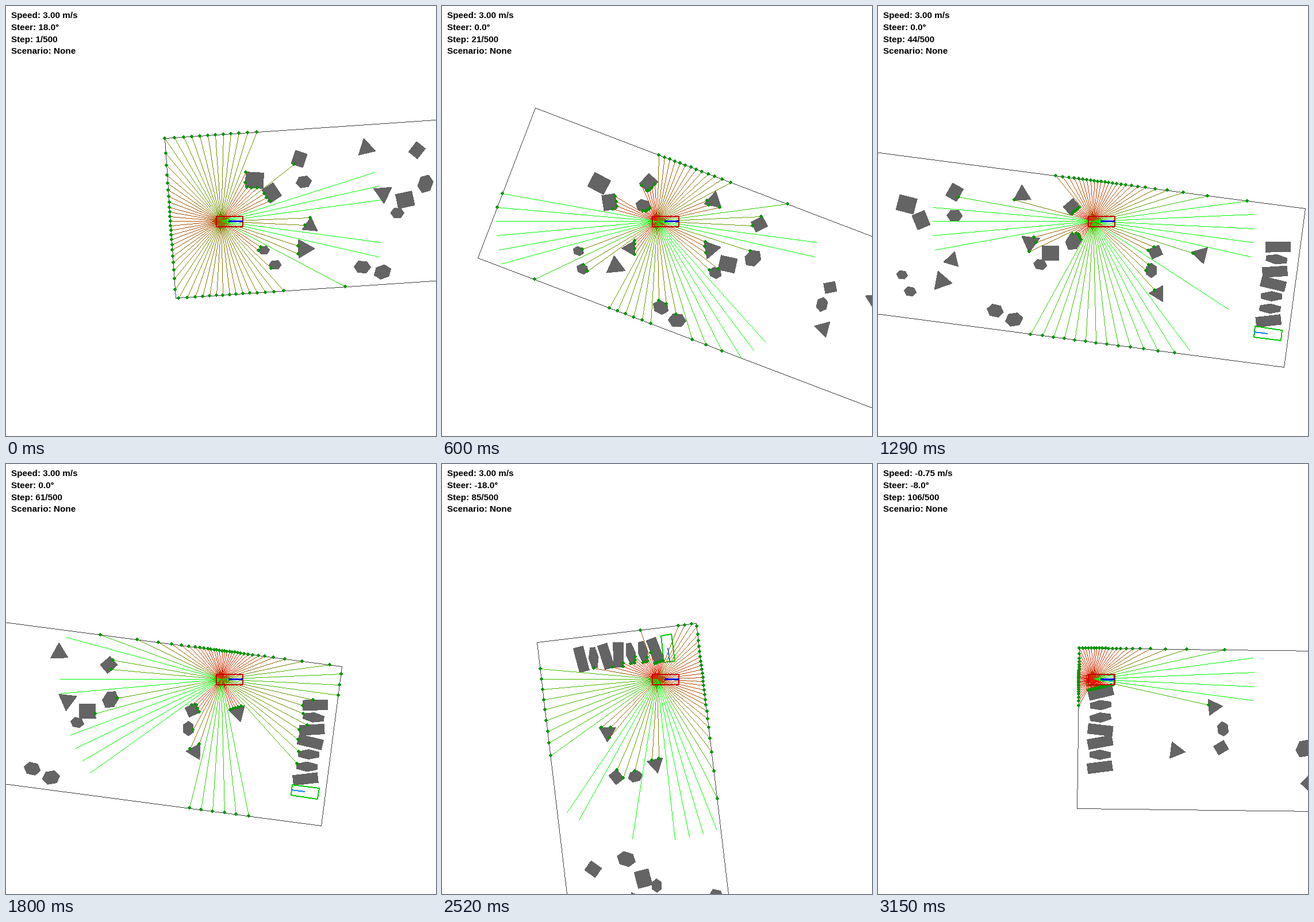
Animation, 748 px wide and 748 px high, one loop 3.18 s. Source, as a matplotlib script:

```python
import matplotlib.pyplot as plt
import numpy as np
from matplotlib.animation import FuncAnimation
from matplotlib.collections import PolyCollection

SIZE, DPI = 748, 100
PT = 72 / DPI                # points per pixel
STEPS, INTERVAL = 106, 30
CENTER = 374.4 + 374.4j      # rear axle on screen
RANGE, RAYS = 280, 72
STRIDE = 3.108               # pixels per step at 1 m/s
WHEELBASE = 28
ROOM_W, ROOM_H = 839, 279

GRAY, DARK = (100, 100, 100), (64, 64, 64)
RED, BLUE = (200, 0, 0), (0, 0, 220)
GREEN, SKY, LEAF = (0, 200, 0), (0, 128, 255), (0, 150, 0)

# Poses (step, x, y, heading in degrees) in room coordinates, y pointing down
WAYPOINTS = [
    (1, 88.4, 150.9, 3.85), (21, 269, 108.7, -20.85), (44, 476.8, 70.3, -7.48),
    (61, 633.7, 49.6, -7.5), (73, 732.2, 90.8, 56.95), (85, 750.5, 200, 96.75),
    (106, 813.9, 224.8, 179.28),
]
# Steering wheel (step, degrees), moved evenly in between
STEER_KEYS = [
    (1, 18), (3, 6), (12, 6), (14, 0), (22, 0), (25, -12), (28, 0), (61, 0),
    (65, -18), (69, -12), (73, -24), (80, 0), (82, 0), (85, -18), (91, -24),
    (92, 12), (102, 12), (106, -8),
]

# Obstacles (x, y, tilt) of each kind, from the largest to the smallest
BOXES = [(150.5, 83, 7), (409.5, 134.7, -8), (179, 107, 60),
         (230.5, 51.3, -68), (436, 50, -48), (590.5, 109, -31.5)]
HEXAGONS = [(446.7, 109.3, -66), (362, 257.3, -17), (327.5, 246.3, 5),
            (236, 91.7, -5), (587.7, 141.7, 82), (394.6, 156.6, 4),
            (176.5, 232.5, 3), (158.7, 205.7, 0)]
TRIANGLES = [(228.2, 207.8, 3), (372.3, 120.6, -151), (347.7, 40.5, -99),
             (669.5, 102.7, -173), (604.8, 179.7, 174), (241.8, 168.8, -81)]
PARKED_TILTS = (-8, 0, -11, 6, -6, -5, -14)
HEX_SLOTS = (1, 4, 5)


def ngon(n, x, y, tilt, radius, squash=1.0, phase=0.0):
    t = phase + 2 * np.pi * np.arange(n) / n
    local = radius * (np.cos(t) + 1j * squash * np.sin(t))
    return x + 1j * y + local * np.exp(1j * np.radians(tilt))


def box(x, y, w, h, tilt=0):
    return ngon(4, x, y, tilt, w / 2 ** 0.5, h / w, np.pi / 4)


def slot_y(slot):
    return 72.5 + 21.6 * slot


def parked(slot, tilt):
    n, radius = (6, 20.8) if slot in HEX_SLOTS else (4, 30.4)
    return ngon(n, 801, slot_y(slot), tilt, radius, 0.4, np.pi / n)


def build_obstacles():
    shapes = [box(x, y, w, 0.87 * w, tilt) for (x, y, tilt), w
              in zip(BOXES, np.linspace(31, 20, len(BOXES)))]
    shapes += [ngon(6, *h, r, 0.8) for h, r
               in zip(HEXAGONS, np.linspace(16.3, 9.7, len(HEXAGONS)))]
    shapes += [ngon(3, *t, r) for t, r
               in zip(TRIANGLES, np.linspace(18.7, 15.3, len(TRIANGLES)))]
    return shapes + [parked(*p) for p in enumerate(PARKED_TILTS)]


def xy(z):
    return np.column_stack((z.real, z.imag))


def cross(a, b):
    return (np.conj(a) * b).imag


def controls():
    step = np.arange(1, STEPS + 1)
    steer = 2 * np.round(np.interp(step, *zip(*STEER_KEYS)) / 2) + 0.0
    # Cruise, then back up and slow down in stages
    reverse = -0.75 * np.minimum(np.ceil((STEPS + 1 - step) / 3), 4)
    return steer, np.where(step <= 91, 3.0, reverse)


def drive(steer, speed):
    """Bicycle model between waypoints, drift spread evenly over each leg."""
    _, x, y, deg = WAYPOINTS[0]
    pos, heading = [np.array([x + y * 1j])], [np.radians([deg])]
    for (s0, x0, y0, d0), (s1, x1, y1, d1) in zip(WAYPOINTS, WAYPOINTS[1:]):
        n = s1 - s0
        h0, h1 = np.radians([d0, d1])
        v = STRIDE * speed[s0:s1]
        dh = -v / WHEELBASE * np.tan(np.radians(steer[s0:s1]))
        dh += (h1 - h0 - dh.sum()) / n
        h = h0 + np.cumsum(dh)
        path = x0 + y0 * 1j + np.cumsum(v * np.exp(1j * (h - dh / 2)))
        path += (x1 + y1 * 1j - path[-1]) * np.arange(1, n + 1) / n
        pos.append(path)
        heading.append(h)
    return np.concatenate(pos), np.concatenate(heading)


STEER, SPEED = controls()
POS, HEADING = drive(STEER, SPEED)

obstacles = build_obstacles()
room = box(ROOM_W / 2, ROOM_H / 2, ROOM_W, ROOM_H)
goal = box(802.6, slot_y(7), 47, 19)
goal_arrow = np.array([802.6, 779.1]) + 1j * slot_y(7)
car = box(388, 374, 46, 18)

solids = obstacles + [room]
SEG_A = np.concatenate(solids)
SEG_D = np.concatenate([np.roll(p, -1) - p for p in solids])
ANGLES = np.linspace(-np.pi, np.pi, RAYS)


def scan(pos, heading):
    """Distance along each ray to the nearest edge, capped at RANGE."""
    d = np.exp(1j * (ANGLES + heading))[:, None]
    with np.errstate(divide="ignore", invalid="ignore"):
        den = cross(d, SEG_D)
        t = cross(SEG_A - pos, SEG_D) / den
        s = cross(SEG_A - pos, d) / den
    hit = (t > 0) & (s >= 0) & (s <= 1)
    return np.minimum(np.where(hit, t, np.inf).min(axis=1), RANGE)


# Hard-edged pixel drawing
canvas = np.zeros((SIZE, SIZE, 4), np.uint8)


def plot(x, y, color):
    ok = (x >= 0) & (x < SIZE) & (y >= 0) & (y < SIZE)
    canvas[y[ok], x[ok]] = (*color, 255)


def line(a, b, color, width=1):
    (x0, y0), (x1, y1) = np.rint(xy(np.array([a, b])))
    dx, dy = abs(x1 - x0), abs(y1 - y0)
    n = int(max(dx, dy)) + 1
    x = np.rint(np.linspace(x0, x1, n)).astype(int)
    y = np.rint(np.linspace(y0, y1, n)).astype(int)
    for k in range(width):
        off = k - (width - 1) // 2
        plot(x + off * (dx < dy), y + off * (dx >= dy), color)


def outline(points, color, width=1):
    for a, b in zip(points, np.roll(points, -1)):
        line(a, b, color, width)


DOT_Y, DOT_X = np.mgrid[-3:3, -3:3]
in_dot = abs(DOT_X + 0.5) + abs(DOT_Y + 0.5) <= 3
DOT_X, DOT_Y = DOT_X[in_dot], DOT_Y[in_dot]


def dot(z, color):
    plot(int(np.rint(z.real)) + DOT_X, int(np.rint(z.imag)) + DOT_Y, color)


fig = plt.figure(figsize=(SIZE / DPI, SIZE / DPI), dpi=DPI, facecolor="white")
ax = fig.add_axes([0, 0, 1, 1])
ax.axis("off")
blocks = ax.add_collection(PolyCollection(
    [], facecolors=np.array(GRAY) / 255, edgecolors="none",
    antialiaseds=False, zorder=1))
layer = ax.imshow(canvas, interpolation="nearest", aspect="auto", zorder=2)
ax.set(xlim=(-0.5, SIZE - 0.5), ylim=(SIZE - 0.5, -0.5))
labels = [ax.text(9, 21 + 20.5 * k, "", family="Liberation Sans",
                  weight="bold", size=15.2 * PT, zorder=3) for k in range(4)]


def update(i):
    pos, heading = POS[i], HEADING[i]

    def view(z):
        return CENTER + (z - pos) * np.exp(-1j * heading)

    blocks.set_verts([xy(view(p)) for p in obstacles])

    canvas[:] = 0
    outline(view(room), DARK)
    outline(view(goal), GREEN, 2)
    line(*view(goal_arrow), SKY, 2)

    dist = scan(pos, heading)
    ends = CENTER + dist * np.exp(1j * ANGLES)
    for end, f in zip(ends, dist / RANGE):
        line(CENTER, end, (int(255 * (1 - f)), int(255 * f), 0))
    for end in ends[dist < RANGE]:
        dot(end, LEAF)

    outline(car, RED, 2)
    line(387 + 374j, 411 + 374j, BLUE, 3)
    layer.set_data(canvas)

    lines = (f"Speed: {SPEED[i]:.2f} m/s", f"Steer: {STEER[i]:.1f}°",
             f"Step: {i + 1}/500", "Scenario: None")
    for label, text in zip(labels, lines):
        label.set_text(text)
    return []


anim = FuncAnimation(fig, update, frames=STEPS, interval=INTERVAL,
                     repeat=True, repeat_delay=0)
plt.show()
```
